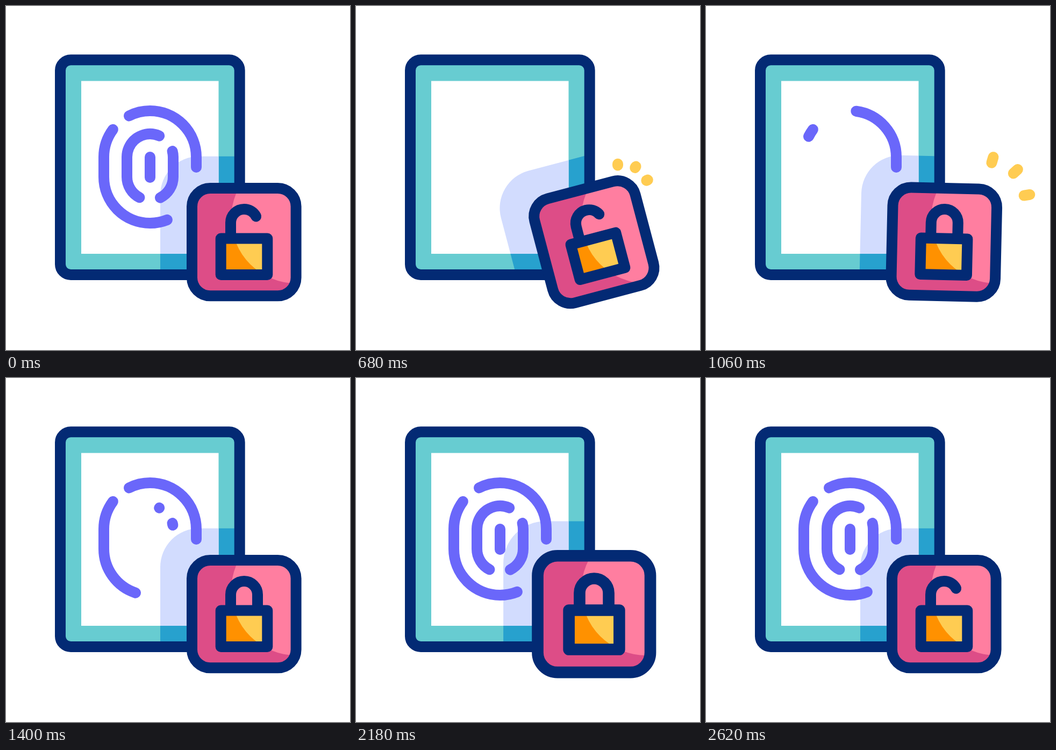
Animation, 640 px wide and 640 px high, one loop 3000 ms. Source, as an HTML page with a canvas:

```html
<!DOCTYPE html>
<html lang="en">
<head>
<meta charset="utf-8">
<title>Fingerprint lock</title>
<style>
  html, body { margin: 0; width: 100%; height: 100%; overflow: hidden; background: #fff; }
  canvas { display: block; width: 100vmin; height: 100vmin; }
</style>
</head>
<body>
<canvas id="stage" width="640" height="640"></canvas>
<script>
const ctx = document.getElementById('stage').getContext('2d');
const LOOP = 3000;
const NAVY = '#032a74', TEAL = '#67ccd1', PURPLE = '#6a67fa', YELLOW = '#ffcc52';
const BADGE = { x: 443, y: 439 };
const rad = deg => deg * Math.PI / 180;

// Eased progress from 0 to 1 between two times.
function ease(t, from, to) {
  const p = Math.min(1, Math.max(0, (t - from) / (to - from)));
  return 0.5 - 0.5 * Math.cos(Math.PI * p);
}

function makePath(build) {
  const path = new Path2D();
  build(path);
  return path;
}

function stroke(path, color) {
  ctx.strokeStyle = color;
  ctx.stroke(path);
}

// Strokes the first part of a path of known length.
function strokePart(path, length, part, color) {
  if (part <= 0) return;
  ctx.setLineDash(part < 1 ? [Math.max(0.01, length * part), 1000] : []);
  stroke(path, color);
  ctx.setLineDash([]);
}

const tablet = makePath(p => p.roundRect(101, 100.3, 333.7, 399.7, 19.5));
const screen = makePath(p => p.rect(140, 139.5, 255.5, 321.5));
const highlight = makePath(p => p.arc(540, 395, 121, 0, 2 * Math.PI));

// Paths relative to the centre of the badge.
const shadow = makePath(p => p.roundRect(-156, -159.3, 400, 400, 72));
const plate = makePath(p => p.roundRect(-97, -100, 193.6, 200.3, 34));
const body = makePath(p => p.rect(-43.3, -6.5, 86.6, 67.5));
const shackle = makePath(p => {
  p.moveTo(-25, -10);
  p.arc(0, -36, 25, Math.PI, 2 * Math.PI);
  p.lineTo(25, -10);
});

const ridges = [
  { from: 800, to: 1200, length: 195, path: makePath(p => {
    p.moveTo(354, 300);
    p.arc(268, 281, 86, 0, rad(-117), true);
  }) },
  { from: 960, to: 1610, length: 260, path: makePath(p => {
    p.arc(268, 281, 86, rad(216.5), Math.PI, true);
    p.arc(268, 318, 86, Math.PI, rad(68.2), true);
  }) },
  { from: 1400, to: 1800, length: 169, path: makePath(p => {
    p.arc(268, 281, 43, rad(-66.4), -Math.PI, true);
    p.arc(268, 318, 43, Math.PI, rad(117), true);
  }) },
  { from: 1350, to: 1750, length: 96, path: makePath(p => {
    p.arc(268, 281, 43, rad(-14.7), 0);
    p.arc(268, 318, 43, 0, rad(64));
  }) },
  { from: 1600, to: 2000, length: 38, path: makePath(p => {
    p.moveTo(268, 281);
    p.lineTo(268, 319);
  }) }
];

const sparks = [
  { x: 79, y: -126.5, angle: -75 },
  { x: 109, y: -114, angle: -44 },
  { x: 123.4, y: -85.6, angle: -10 }
];

function badgeMatrix(t) {
  const angle = -24 * ease(t, 200, 590) + 36 * ease(t, 590, 860) - 12 * ease(t, 860, 1115);
  const scale = 1 + 0.125 * (ease(t, 2000, 2300) - ease(t, 2300, 2600));
  return new DOMMatrix().translate(BADGE.x, BADGE.y).rotate(angle).scale(scale);
}

function moved(path, matrix) {
  const result = new Path2D();
  result.addPath(path, matrix);
  return result;
}

// Fills a shape, then the part of it covered by another shape.
function fillOverlap(shape, base, cover, color) {
  ctx.save();
  ctx.fillStyle = base;
  ctx.fill(shape);
  ctx.clip(shape);
  ctx.fillStyle = color;
  ctx.fill(cover);
  ctx.restore();
}

function drawFingerprint(t) {
  const fading = t < 400;
  ctx.save();
  if (fading) ctx.globalAlpha = 1 - ease(t, 200, 400);
  for (const r of ridges) {
    strokePart(r.path, r.length, fading ? 1 : ease(t, r.from, r.to), PURPLE);
  }
  ctx.restore();
}

function drawSparks(t) {
  const reach = 34.5;
  const tip = reach * ease(t, 620, 960);
  const tail = reach * ease(t, 850, 1190);
  if (tip - tail < 0.05) return;
  for (const s of sparks) {
    const dx = Math.cos(rad(s.angle)), dy = Math.sin(rad(s.angle));
    stroke(makePath(p => {
      p.moveTo(s.x + dx * tail, s.y + dy * tail);
      p.lineTo(s.x + dx * tip, s.y + dy * tip);
    }), YELLOW);
  }
}

function draw(t) {
  const matrix = badgeMatrix(t);
  const cover = moved(shadow, matrix);

  ctx.fillStyle = '#fff';
  ctx.fillRect(0, 0, 640, 640);
  ctx.lineWidth = 20;
  ctx.lineCap = ctx.lineJoin = 'round';

  fillOverlap(tablet, TEAL, cover, '#27a1ce');
  fillOverlap(screen, '#fff', cover, '#d2dcfe');
  stroke(tablet, NAVY);
  drawFingerprint(t);

  // The highlight stays still while the badge turns around it.
  fillOverlap(moved(plate, matrix), '#dd4d87', highlight, '#ff7ea0');
  fillOverlap(moved(body, matrix), '#ff9100', highlight, YELLOW);

  ctx.save();
  ctx.transform(matrix.a, matrix.b, matrix.c, matrix.d, matrix.e, matrix.f);
  stroke(plate, NAVY);
  stroke(body, NAVY);
  const closed = ease(t, 800, 1000) - ease(t, 2400, 2600);
  strokePart(shackle, 130.5, 0.705 + 0.295 * closed, NAVY);
  drawSparks(t);
  ctx.restore();
}

function tick() {
  draw(performance.now() % LOOP);
  requestAnimationFrame(tick);
}
tick();
</script>
</body>
</html>
```
